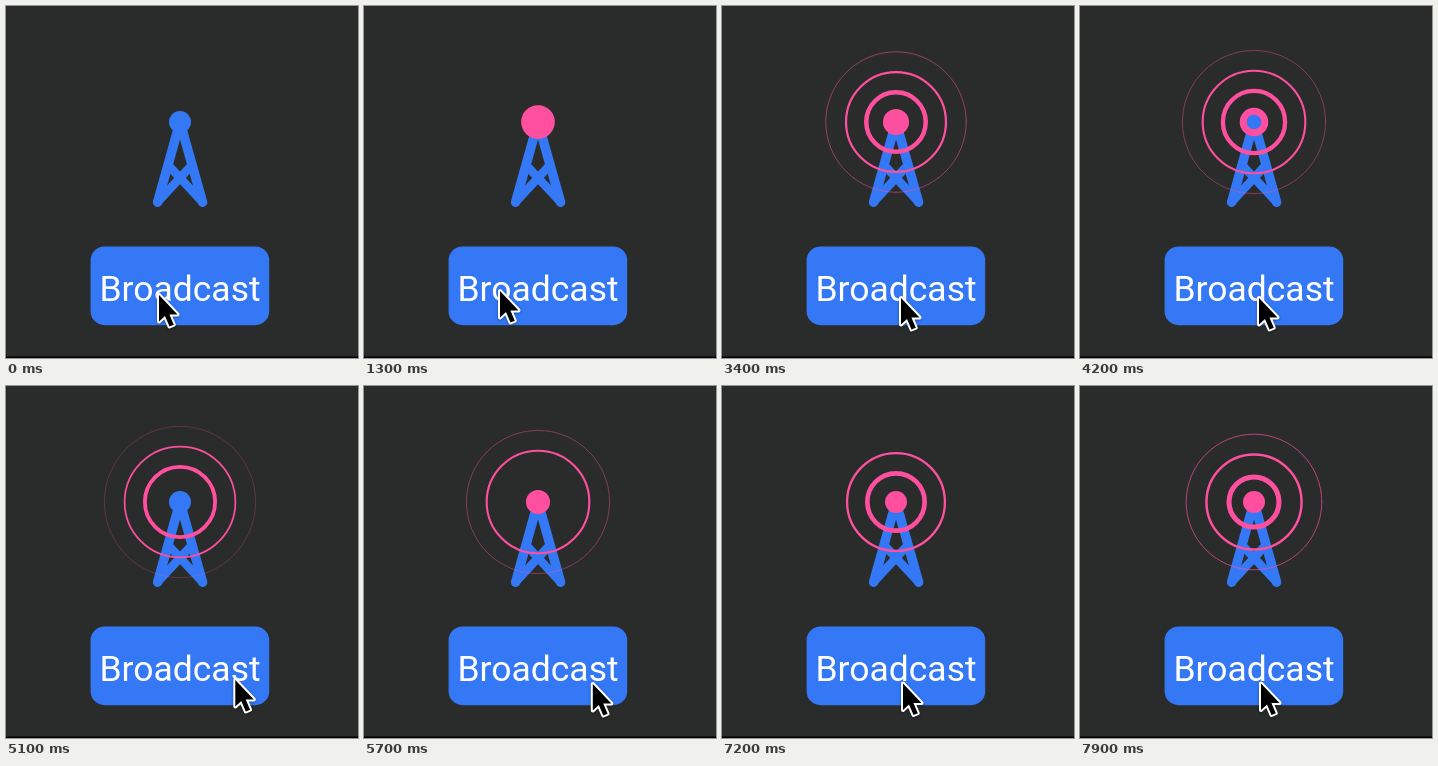
An HTML page with a canvas that plays this animation: 352x352 px, repeating every 8 s.

```html
<!DOCTYPE html>
<html lang="en">
<head>
<meta charset="utf-8">
<title>Broadcast</title>
<style>
  html, body { margin: 0; width: 100%; height: 100%; overflow: hidden; background: #2a2c2b; }
  canvas { display: block; width: 352px; height: 352px; }
</style>
</head>
<body>
<canvas id="stage" width="352" height="352"></canvas>
<script>
const ctx = document.getElementById("stage").getContext("2d");
const LOOP = 8000;
const BLUE = "#3478f6", PINK = "#ff4f9f";
const HUB = { x: 174, y: 116 };

// Broadcasting sessions: a wave leaves every PERIOD ms until the session ends.
const sessions = [[800, 4100], [5390, 6500], [6975, LOOP]];
const PERIOD = 750, LIFE = 3000, REACH = 81;

// Times during which the click indicator is visible.
const clicks = [[700, 1100], [3900, 4180], [5250, 5550], [6300, 6560], [6830, 7080]];

// Cursor stops: [leave, arrive, x, y]
const moves = [
  [0, 0, 152, 287],
  [780, 1080, 135, 283],
  [2580, 3180, 178, 290],
  [4380, 4900, 228.3, 292],
  [5120, 5250, 227.8, 296],
  [6540, 6820, 180, 295.5]
];

const within = (t, [from, to]) => t >= from && t < to;
const smooth = k => k * k * (3 - 2 * k);

function line(width, color, ...points) {
  ctx.beginPath();
  points.forEach(([x, y]) => ctx.lineTo(x, y));
  ctx.lineWidth = width;
  ctx.strokeStyle = color;
  ctx.stroke();
}

function circle(x, y, r, width, color) {
  ctx.beginPath();
  ctx.arc(x, y, r, 0, Math.PI * 2);
  ctx.lineWidth = width;
  ctx.strokeStyle = color;
  ctx.stroke();
}

function drawTower(active) {
  const left = [151.6, 196.2], right = [196.6, 196.2];
  ctx.lineCap = ctx.lineJoin = "round";
  line(9.5, BLUE, left, [HUB.x, HUB.y], right);
  line(8.5, BLUE, [163, 160], right);
  line(8.5, BLUE, [185, 160], left);
  ctx.beginPath();
  ctx.arc(HUB.x, HUB.y, 11, 0, Math.PI * 2);
  ctx.fillStyle = active ? PINK : BLUE;
  ctx.fill();
}

function drawWaves(t) {
  for (const [start, end] of sessions) {
    for (let born = start; born < end && born <= t; born += PERIOD) {
      const p = (t - born) / LIFE;
      if (p >= 1) continue;
      const width = Math.max(0.25, 8.5 * (1 - p) ** 1.4);
      circle(HUB.x, HUB.y, REACH * p, width, PINK);
    }
  }
}

function drawButton() {
  ctx.beginPath();
  ctx.roundRect(84.6, 240.5, 178.6, 78.7, 14);
  ctx.fillStyle = BLUE;
  ctx.fill();
  ctx.font = "35.5px Roboto, sans-serif";
  ctx.textAlign = "center";
  ctx.fillStyle = "#fff";
  ctx.fillText("Broadcast", 174, 294.7);
}

function cursorAt(t) {
  let [, , x, y] = moves[0];
  for (const [leave, arrive, toX, toY] of moves.slice(1)) {
    if (t < leave) break;
    const k = smooth(Math.min(1, (t - leave) / (arrive - leave)));
    x += (toX - x) * k;
    y += (toY - y) * k;
  }
  return { x, y };
}

function drawCursor({ x, y }) {
  ctx.save();
  ctx.translate(x, y);
  ctx.beginPath();
  [[1, 2], [1, 28.5], [7, 23], [11.5, 33.5], [15.8, 31.7], [11.4, 21.5], [19.5, 21.5]]
    .forEach(([px, py]) => ctx.lineTo(px, py));
  ctx.closePath();
  ctx.lineJoin = "round";
  ctx.lineWidth = 4;
  ctx.strokeStyle = "#fff";
  ctx.shadowColor = "rgba(0,0,0,.35)";
  ctx.shadowBlur = 3;
  ctx.shadowOffsetY = 1;
  ctx.stroke();
  ctx.shadowColor = "transparent";
  ctx.fillStyle = "#000";
  ctx.fill();
  ctx.restore();
}

function draw(t) {
  ctx.fillStyle = "#2a2c2b";
  ctx.fillRect(0, 0, 352, 352);
  ctx.fillStyle = "#000";
  ctx.fillRect(0, 350.5, 352, 1.5);
  drawTower(sessions.some(s => within(t, s)));
  drawWaves(t);
  drawButton();
  const cursor = cursorAt(t);
  if (clicks.some(c => within(t, c))) {
    circle(cursor.x, cursor.y + 2, 42, 5.6, "#fff");
    circle(cursor.x, cursor.y + 2, 42, 3.6, "#000");
  }
  drawCursor(cursor);
}

const origin = performance.now();
function tick() {
  draw((performance.now() - origin) % LOOP);
  requestAnimationFrame(tick);
}
tick();
</script>
</body>
</html>
```
